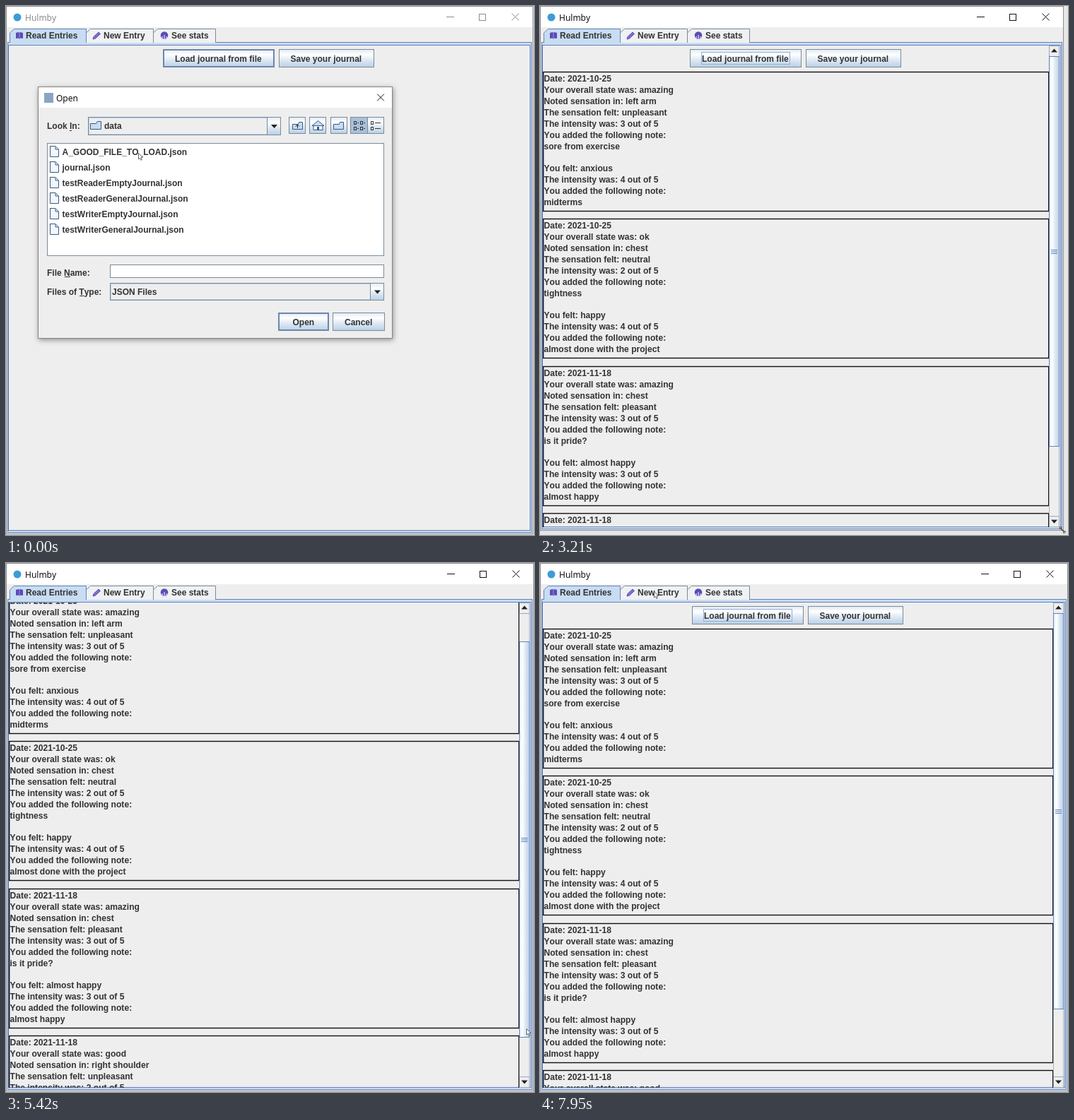
Write an HTML page with a canvas that moves like this. It is 747 px wide and 749 px high and loops after 8 s.

```html
<!DOCTYPE html>
<html lang="en">
<head>
<meta charset="utf-8">
<title>Journal demo</title>
<style>
  html, body { margin: 0; width: 100%; height: 100%; overflow: hidden; background: #fff }
  canvas { display: block }
</style>
</head>
<body>
<canvas id="stage" width="747" height="749"></canvas>
<script>
const ctx = document.getElementById('stage').getContext('2d');
const LOOP = 8000;
const STEEL = '#7a8a99', BLUE = '#6382bf', PALE = '#c8ddf2', PANEL = '#eee', INK = '#333', PURPLE = '#5b4bb5';
const BOLD = 'bold 12px "Liberation Sans", Arial, sans-serif';
const ENTRY = 'bold 12.1px "Liberation Sans", Arial, sans-serif';
const TITLE = '12px "Noto Sans", "Open Sans", sans-serif';

const TICKS = [0, 130, 260, 390, 520, 640, 770, 900, 1030, 1180, 1340, 1490, 1620, 2020, 2150, 2540,
  2690, 3080, 3210, 3490, 3650, 3790, 4200, 4460, 4590, 4720, 4870, 5000, 5130, 5280, 5420, 5550,
  5700, 5840, 6120, 6250, 6370, 6500, 6780, 6910, 7040, 7170, 7430, 7560, 7690, 7820, 7950];

// Keyframes: [time, values...]
const POINTER = [[0, 187, 208], [260, 188, 206], [640, 449, 465], [900, 427, 454], [1030, 427, 454],
  [1180, 477, 509], [1340, 707, 735], [1490, 760, 760], [4200, 760, 608], [4460, 739, 607],
  [4720, 738, 614], [5420, 736, 659], [5700, 736, 713], [5840, 736, 719], [6120, 738, 669],
  [6250, 739, 650], [6500, 736, 574], [7170, 360, 229], [7950, 161, 40]];
const SIZE = [[2690, 746, 747], [3080, 743, 744], [3210, 741, 742], [3490, 744, 745], [3650, 746, 747], [3790, 747, 747]];
const THUMB = [[4720, 0], [5420, 40], [5700, 94], [5840, 94], [6120, 75], [6250, 55], [6500, 0]];

const FILES = ['A_GOOD_FILE_TO_LOAD', 'journal', 'testReaderEmptyJournal', 'testReaderGeneralJournal',
  'testWriterEmptyJournal', 'testWriterGeneralJournal'].map(name => name + '.json');

// date, state, place, sensation, intensity, note, feeling, intensity, note
const ENTRIES = [
  ['2021-10-25', 'amazing', 'left arm', 'unpleasant', 3, 'sore from exercise', 'anxious', 4, 'midterms'],
  ['2021-10-25', 'ok', 'chest', 'neutral', 2, 'tightness', 'happy', 4, 'almost done with the project'],
  ['2021-11-18', 'amazing', 'chest', 'pleasant', 3, 'is it pride?', 'almost happy', 3, 'almost happy'],
  ['2021-11-18', 'good', 'right shoulder', 'unpleasant', 2, 'slept badly']
];

function sample(keys, t) {
  const next = keys.findIndex(k => k[0] > t);
  if (next === 0) return keys[0].slice(1);
  if (next < 0) return keys[keys.length - 1].slice(1);
  const a = keys[next - 1], b = keys[next], f = (t - a[0]) / (b[0] - a[0]);
  return a.slice(1).map((v, i) => Math.round(v + (b[i + 1] - v) * f));
}

function fill(x, y, w, h, color) { ctx.fillStyle = color; ctx.fillRect(x, y, w, h); }
function frame(x, y, w, h, color, line = 1) {
  ctx.strokeStyle = color; ctx.lineWidth = line;
  ctx.strokeRect(x + .5, y + .5, w - 1, h - 1);
}
function path(points, stroke, color, line = 1) {
  ctx.beginPath();
  points.forEach(([x, y], i) => i ? ctx.lineTo(x, y) : ctx.moveTo(x, y));
  if (color) { ctx.closePath(); ctx.fillStyle = color; ctx.fill(); }
  if (stroke) { ctx.strokeStyle = stroke; ctx.lineWidth = line; ctx.stroke(); }
}
function text(s, x, y, color = INK, font = BOLD) {
  ctx.font = font; ctx.fillStyle = color; ctx.fillText(s, x, y);
}
function disc(x, y, r, color) {
  ctx.fillStyle = color; ctx.beginPath(); ctx.arc(x, y, r, 0, 7); ctx.fill();
}
function gloss(x, y, w, h, sideways) {
  const g = sideways ? ctx.createLinearGradient(x, 0, x + w, 0) : ctx.createLinearGradient(0, y, 0, y + h);
  g.addColorStop(0, '#dde8f3'); g.addColorStop(.3, '#fff'); g.addColorStop(.6, '#dde8f3'); g.addColorStop(1, '#b8cfe5');
  fill(x, y, w, h, g);
}
function box(x, y, w, h, color = STEEL) { gloss(x, y, w, h); frame(x, y, w, h, color); }
function button(label, x, y, w, h, tx, strong, pressed) {
  box(x, y, w, h);
  if (pressed) fill(x + 1, y + 1, w - 2, h - 2, '#b8cfe5');
  if (strong) frame(x + 1, y + 1, w - 2, h - 2, BLUE);
  text(label, x + tx, y + 18);
}
function arrow(x, y, dir = 1) { path([[x - 4.5, y - 2 * dir], [x + 4.5, y - 2 * dir], [x, y + 3 * dir]], null, '#222'); }
function cross(x, y, r, color) {
  path([[x - r, y - r], [x + r, y + r]], color);
  path([[x + r, y - r], [x - r, y + r]], color);
}
function underline(x, y, w) { fill(x, y, w, 1, INK); }

function tab(label, x, w, tx, selected) {
  const shape = [[x, 52], [x, 38], [x + 6, 32.5], [x + w, 32.5], [x + w, 52]];
  path(shape, null, selected ? PALE : '#f0f1f3');
  path(shape, selected ? BLUE : STEEL);
  text(label, tx, 46);
}

function tabs(R, cr, cb) {
  fill(2, 52, R - 4, cb - 48, PALE);
  frame(2, 51, R - 4, cb - 47, BLUE);
  tab('New Entry', 113.5, 95, 138);
  tab('See stats', 208.5, 88, 234);
  tab('Read Entries', 5.5, 108, 28, true);
  fill(6, 51, 107, 3, PALE);
  fill(4, 56, cr - 3, cb - 55, PANEL);
  frame(3, 55, cr - 1, cb - 54, BLUE);
  // book
  path([[14, 38], [18, 37], [19, 38], [20, 37], [24, 38], [24, 46], [20, 45.5], [19, 47], [18, 45.5], [14, 46]], null, PURPLE);
  path([[19, 38], [19, 46]], '#9a90dc');
  // pencil
  path([[123, 47], [124, 43.5], [131, 37], [133.5, 39.5], [126.5, 46]], PURPLE, '#7d70cc');
  // chart
  disc(224, 41.5, 5.3, PURPLE);
  [221, 224, 227].forEach((x, i) => fill(x - .5, 43 - i % 2 * 2, 1.2, 6, '#e4e0f8'));
}

function entryLines([date, state, place, sense, level, note, feeling, level2, note2]) {
  const rated = (n, s) => [`The intensity was: ${n} out of 5`, 'You added the following note:', s];
  const lines = [`Date: ${date}`, `Your overall state was: ${state}`, `Noted sensation in: ${place}`,
    `The sensation felt: ${sense}`, ...rated(level, note)];
  return feeling ? [...lines, `You felt: ${feeling}`, ...rated(level2, note2)] : lines;
}

function entries(right, scroll) {
  ENTRIES.forEach((entry, i) => {
    const top = Math.floor(93 + i * 208.5) - scroll, lines = entryLines(entry);
    frame(4.2, top, right - 4, lines.length > 7 ? 198 : 133, '#111', 1.4);
    lines.forEach((line, n) => text(line, 5.5, top + 13.5 + n * 16 + (n > 6 ? 15 : 0), INK, ENTRY));
  });
}

function scrollbar(x, bottom, track, size, offset) {
  fill(x, 56, 15, bottom - 56, PANEL);
  frame(x, 56, 15, bottom - 55, '#a9b5c1');
  for (const [y, dir] of [[56, -1], [bottom - 15, 1]]) {
    frame(x, y, 15, 16, '#9aa8b5');
    arrow(x + 7.5, y + 7.5, dir);
  }
  const top = 71 + offset, mid = Math.round(top + size / 2);
  gloss(x, top, 15, size, true);
  frame(x, top, 15, size, BLUE);
  for (let i = -1; i < 2; i++) fill(x + 3, mid + i * 2.5 - .5, 9, 1, BLUE);
}

function appWindow(t) {
  const [R, B] = sample(SIZE, t), cr = R - 6, cb = B - 5;
  const active = t >= 1030, loaded = t >= 1490, bar = t >= 3080;
  const tone = active ? '#111' : '#8c8c8c';
  fill(0, 0, 747, 749, '#e6e6e6');
  fill(0, 0, R, B + 1, PANEL);
  fill(1, 1, R - 2, 29, '#fff');
  frame(0, 0, R, B + 1, '#8d8d8d');
  disc(16, 16, 5.5, '#3f9bd6');
  text('Hulmby', 27, 20.5, tone, TITLE);
  fill(R - 123, 15, 11, 1, tone);
  frame(R - 77, 11, 10, 10, tone);
  cross(R - 25.5, 15.5, 5, tone);
  tabs(R, cr, cb);

  const right = bar ? cr - 15 : cr, track = cb - 87, size = Math.round(track * (cb - 56) / 801);
  const [offset] = sample(THUMB, t), scroll = Math.round(offset * 801 / track);
  ctx.save();
  ctx.beginPath(); ctx.rect(4, 56, cr - 4, cb - 55); ctx.clip();
  const bx = Math.ceil((right + 2) / 2) - 149, by = 61 - scroll;
  button('Load journal from file', bx, by, 158, 26, 17, !loaded);
  button('Save your journal', bx + 164, by, 135, 26, 16.5);
  if (loaded) {
    frame(bx + 16, by + 4, 126, 18, '#8fb0d8');
    entries(right, scroll);
  }
  ctx.restore();
  if (bar) scrollbar(cr - 15, cb, track, size, offset);
  if (t >= 2020 && t < 4200) resizePointer(R - 2, B);
}

function folder(x, y, w, h) {
  path([[x, y + h], [x, y + 3], [x + w * .55, y + 3], [x + w * .65, y], [x + w, y], [x + w, y + h], [x, y + h]], '#355a86', '#c9dcf0');
}

function combo(x, y, w, h) {
  fill(x, y, w, h, PANEL);
  frame(x, y, w, h, STEEL);
  frame(x + 1, y + 1, w - 2, h - 2, '#b8cfe5');
  box(x + w - 20, y, 20, h);
  arrow(x + w - 9.5, y + h / 2);
}

function dialog(t) {
  const picked = t >= 260;
  ctx.save();
  ctx.shadowColor = 'rgba(0,0,0,.4)'; ctx.shadowBlur = 7; ctx.shadowOffsetX = 1; ctx.shadowOffsetY = 2;
  fill(45, 114, 502, 357, PANEL);
  ctx.restore();
  fill(46, 115, 500, 29, '#fff');
  frame(45, 114, 502, 357, '#858585');
  fill(54, 123, 13, 14, '#8aa4c4');
  text('Open', 71, 134.5, '#111', TITLE);
  cross(530, 129.5, 4.8, '#111');

  text('Look In:', 58, 174); underline(90, 176, 3);
  combo(116, 157, 273, 26);
  folder(119.5, 163.5, 15, 11);
  text('data', 139, 174);
  for (const x of [400, 429, 459]) box(x, 157, 24, 24);
  folder(405.5, 164.5, 14, 10);
  path([[412.5, 173], [412.5, 168], [410, 170.5], [412.5, 168], [415, 170.5]], '#234');
  path([[435, 169], [435, 175.5], [448, 175.5], [448, 169]], '#355a86', '#f3f7fb');
  path([[433, 169.5], [441.5, 162.5], [450, 169.5]], '#355a86', '#c9dcf0');
  fill(440, 171, 3, 5, '#355a86');
  folder(463.5, 164.5, 14, 10);
  box(511, 157, 24, 24);
  fill(487, 157, 25, 24, '#a9c0da'); frame(487, 157, 25, 24, STEEL);
  for (const y of [163, 171]) {
    for (const x of [492, 501]) { frame(x, y, 4, 5, INK); fill(x + 5, y + 2, 2, 1, INK); }
    frame(516, y, 4, 5, INK); fill(522, y + 2, 8, 1, INK);
  }

  fill(58, 194, 477, 160, '#fff'); frame(58, 194, 477, 160, STEEL);
  FILES.forEach((name, i) => {
    const y = 199 + i * 22;
    if (picked && !i) fill(78, y - 2, 179, 20, '#b8cfe5');
    path([[62.5, y - .5], [70, y - .5], [74.5, y + 4], [74.5, y + 14.5], [62.5, y + 14.5], [62.5, y - 1]], '#355a86', '#f4f8fc');
    path([[70, y], [70, y + 4], [74, y + 4]], '#355a86');
    text(name, 79.5, y + 12.3);
  });

  text('File Name:', 58, 381.5); underline(83, 383, 8);
  fill(147, 366, 388, 19, '#fff'); frame(147, 366, 388, 19, STEEL);
  if (picked) text(FILES[0], 150, 380);
  text('Files of Type:', 58, 408.5); underline(104, 410, 7);
  combo(147, 392, 388, 25);
  text('JSON Files', 150, 409);
  button('Open', 385, 434, 72, 26, 20.5, true, t >= 900);
  button('Cancel', 462, 434, 74, 26, 17);
}

function pointer(x, y) {
  path([[0, 0], [0, 8.5], [2, 6.8], [3.4, 9.8], [4.8, 9.2], [3.5, 6.2], [6, 6], [0, 0]]
    .map(([dx, dy]) => [x + dx + .5, y + dy + .5]), '#444', '#fff', .8);
}

function resizePointer(x, y) {
  const tip = s => [[x + s * 4, y + s * 4], [x + s * 4, y + s], [x + s, y + s * 4]];
  path([[x - 3, y - 3], [x + 3, y + 3]], '#333', null, 1.2);
  path(tip(-1), '#333', '#fff', .8);
  path(tip(1), '#333', '#fff', .8);
}

function draw(now) {
  const time = now % LOOP;
  const t = TICKS.filter(tick => tick <= time).pop();
  ctx.fontKerning = 'none';
  appWindow(t);
  if (t < 1030) dialog(t);
  pointer(...sample(POINTER, t));
}

const start = performance.now();
function loop() {
  draw(performance.now() - start);
  requestAnimationFrame(loop);
}
loop();
</script>
</body>
</html>
```
